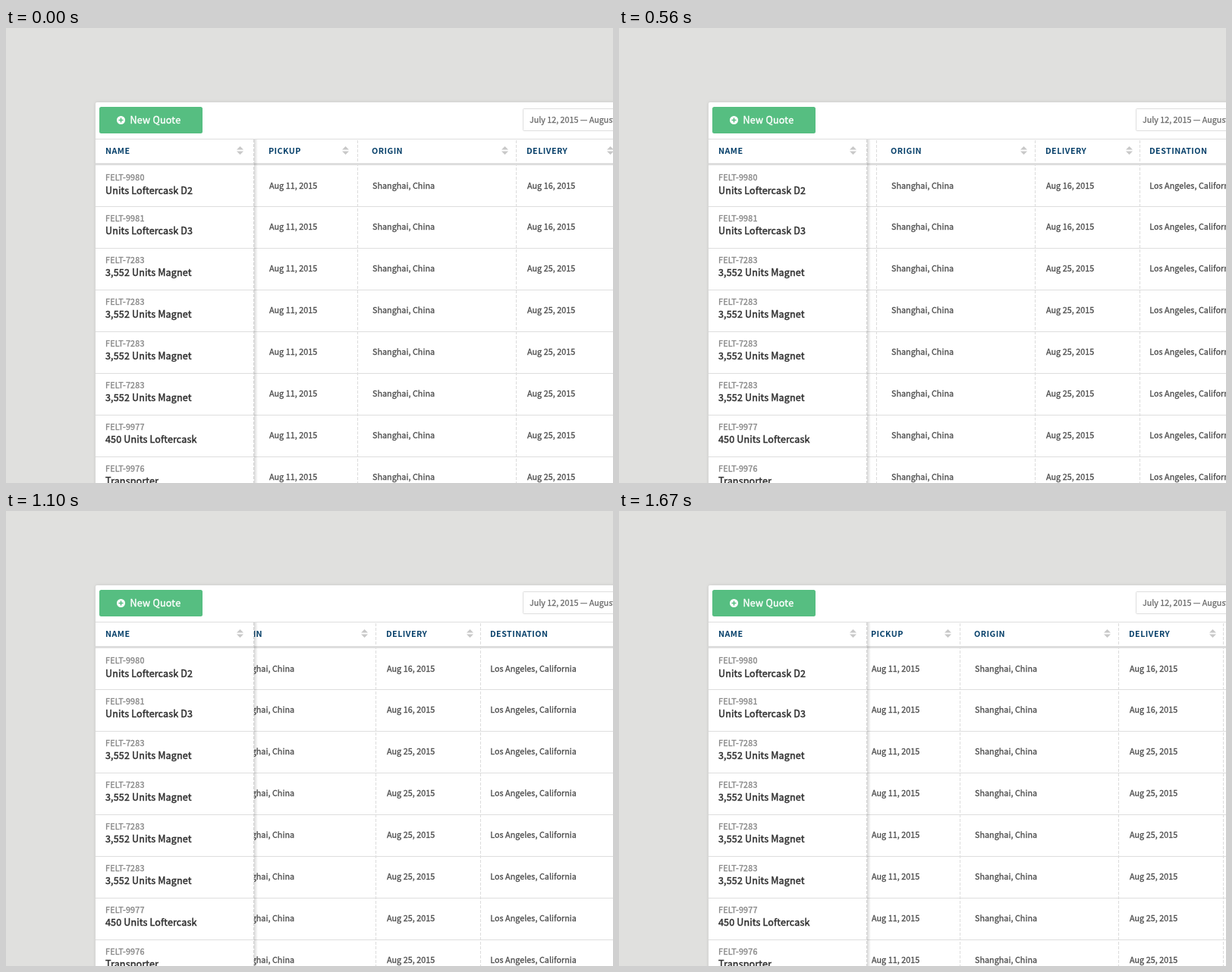
Animation of 800x600 px, one loop 1700 ms. Source, as an HTML page:

```html
<!DOCTYPE html>
<html lang="en">
<head>
<meta charset="utf-8">
<title>Quotes table</title>
<style>
  @property --scroll { syntax: "<integer>"; inherits: false; initial-value: 0; }
  html, body { margin: 0; width: 100%; height: 100%; overflow: hidden; background: #e0e0de; }
  svg { display: block; width: 800px; height: 600px; }
  text {
    font: 400 10.74px "Noto Sans CJK SC", "Noto Sans CJK JP", "Noto Sans CJK", sans-serif;
    fill: currentColor; stroke: currentColor; white-space: pre;
  }
  .head { color: #07406a; font-weight: 700; letter-spacing: .45px; stroke: none; }
  .code { color: #868686; stroke-width: .35px; letter-spacing: .2px; }
  .name { color: #2e2e2e; font-size: 12.53px; stroke-width: .45px; letter-spacing: .15px; }
  .cell { color: #4c4c4c; stroke-width: .3px; letter-spacing: .05px; }
  .date { color: #666; stroke-width: .25px; }
  .button { color: #fff; font-size: 12.53px; stroke-width: .4px; letter-spacing: .25px; }
  .card { fill: #fff; filter: drop-shadow(0 0 2px rgba(0, 0, 0, .1)); }
  .rule { fill: #dedede; }
  .divider { stroke: #dcdcdc; stroke-dasharray: 4 2; }
  .sort { fill: #c8c8c8; }

  /* Steps of 30 ms, with a pause at each end */
  #columns {
    transform: translateX(calc(var(--scroll) * 1px));
    animation: scroll 1700ms infinite;
  }
  @keyframes scroll {
    0% { --scroll: 0; animation-timing-function: step-end; }
    9.999% { --scroll: 0; animation-timing-function: steps(22, start); }
    48.82% { --scroll: -195; animation-timing-function: step-end; }
    55.88% { --scroll: -204; animation-timing-function: step-end; }
    64.7% { --scroll: -185; animation-timing-function: steps(20, end); }
    100% { --scroll: -5; }
  }
</style>
</head>
<body>
<svg viewBox="0 0 800 600">
  <defs>
    <clipPath id="viewport"><rect x="327" y="147" width="473" height="453"/></clipPath>
    <linearGradient id="shade">
      <stop offset="0" stop-color="#000" stop-opacity=".15"/>
      <stop offset="1" stop-color="#000" stop-opacity="0"/>
    </linearGradient>
  </defs>

  <rect class="card" x="118" y="98" width="700" height="520" rx="2"/>

  <rect x="123" y="104" width="136" height="35" rx="2.5" fill="#56be81"/>
  <circle cx="151.5" cy="121.5" r="5.5" fill="#fff"/>
  <path d="M148.5 121.5h6M151.5 118.5v6" stroke="#56be81" stroke-width="1.6"/>
  <text class="button" x="163.5" y="126">New Quote</text>

  <rect x="681.5" y="106.5" width="180" height="29" rx="1" fill="#fff" stroke="#dedede"/>
  <text class="date" x="690" y="125">July 12, 2015 — August 11, 2015</text>

  <g id="rules"></g>
  <g clip-path="url(#viewport)"><g id="columns"></g></g>
  <rect x="327" y="147" width="5" height="453" fill="url(#shade)"/>
  <path d="M326.5 147V600" stroke="#d2d2d2" stroke-dasharray="4 2"/>
  <g id="names"></g>
</svg>
<script>
  const shipments = [
    ["FELT-9980", "Units Loftercask D2", 16],
    ["FELT-9981", "Units Loftercask D3", 16],
    ...Array(4).fill(["FELT-7283", "3,552 Units Magnet", 25]),
    ["FELT-9977", "450 Units Loftercask", 25],
    ["FELT-9976", "Transporter", 25],
  ];
  const columns = [
    { title: "PICKUP", x: 346, cellX: 347, end: 463, sortX: 447.5, value: () => "Aug 11, 2015" },
    { title: "ORIGIN", x: 482, cellX: 483, end: 672, sortX: 657.5, value: () => "Shanghai, China" },
    { title: "DELIVERY", x: 686, cellX: 687, end: 810, sortX: 796.5, value: day => `Aug ${day}, 2015` },
    { title: "DESTINATION", x: 823, cellX: 823.3, end: 1011, sortX: 996.5, value: () => "Los Angeles, California" },
  ];

  const text = (style, x, y, content) => `<text class="${style}" x="${x}" y="${y}">${content}</text>`;
  const rule = (y, height = 1) => `<rect class="rule" x="118" y="${y}" width="682" height="${height}"/>`;
  const sort = x => `<path class="sort" d="M${x - 4.5} 160.5l4.5 -4.5l4.5 4.5zM${x - 4.5} 162.5l4.5 4.5l4.5 -4.5z"/>`;
  const divider = x => `<path class="divider" d="M${x + .5} 148V600"/>`;
  const fill = (id, parts) => { document.getElementById(id).innerHTML = parts.join(""); };

  // The first row sits slightly lower than the regular 55px rhythm.
  const rowY = (base, row, firstShift) => base + row * 55 + (row ? 0 : firstShift);

  fill("rules", [
    rule(146), rule(178, 3),
    ...shipments.slice(1).map((_, row) => rule(235 + row * 55)),
  ]);

  fill("names", [
    text("head", 131, 166, "NAME"), sort(308.5),
    ...shipments.map(([code, name], row) =>
      text("code", 131, rowY(200, row, 1), code) +
      text("name", 131, rowY(217, row, 2), name)),
  ]);

  fill("columns", columns.map(({ title, x, cellX, end, sortX, value }) =>
    text("head", x, 166, title) + sort(sortX) + divider(end) +
    shipments.map(([, , day], row) =>
      text("cell", cellX, rowY(211, row, 1), value(day))).join("")));
</script>
</body>
</html>
```
